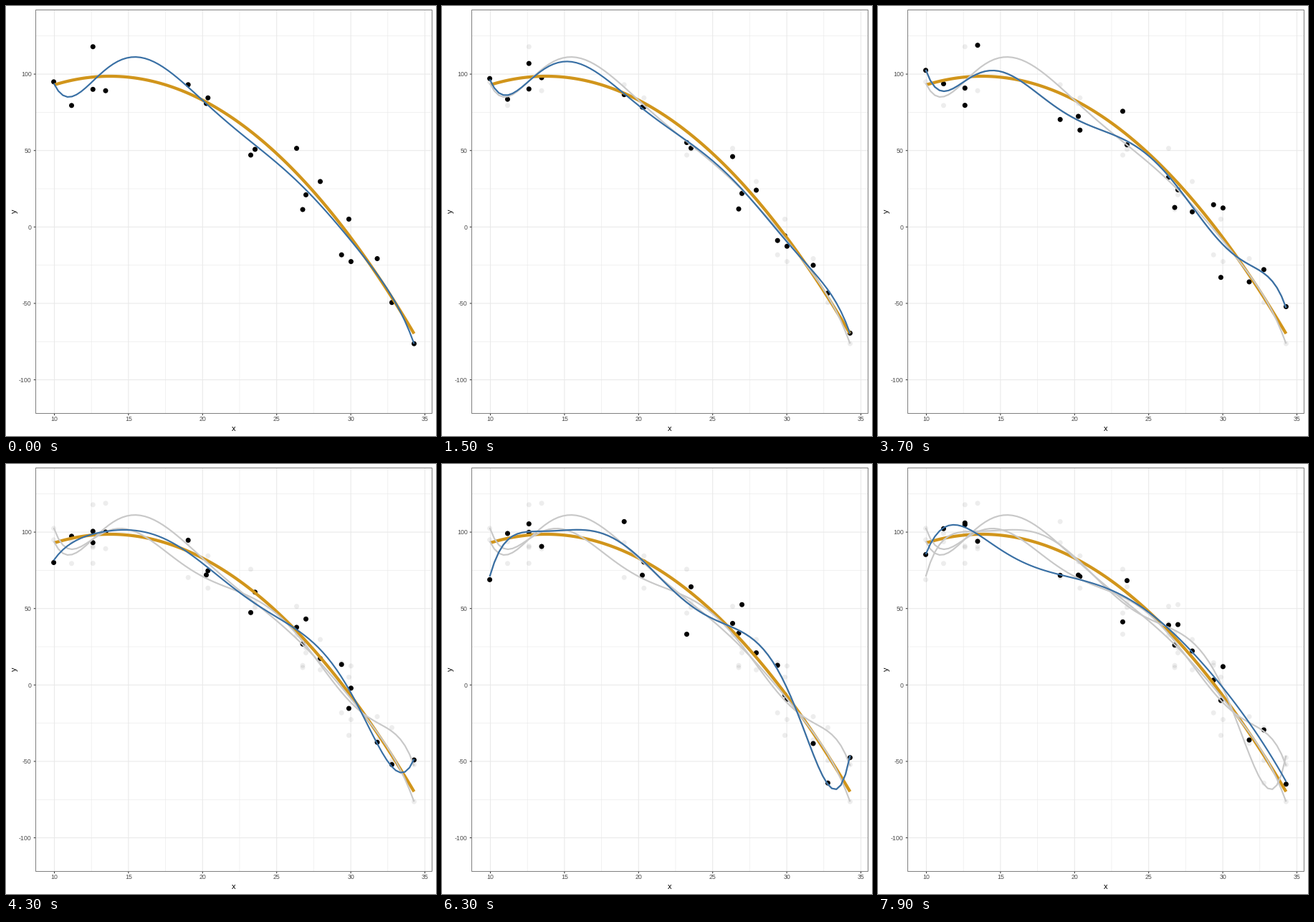
Recreate the animation shown at these times as a matplotlib script. Size 600x600 px, loop 8000 ms.

```python
import numpy as np
import matplotlib.pyplot as plt
from matplotlib.animation import FuncAnimation
from matplotlib.patches import Rectangle
from numpy.polynomial import Polynomial

plt.rcParams["font.family"] = "Liberation Sans"

SIZE, DPI = 600, 100
PT = 72 / DPI  # points per pixel
FRAMES, INTERVAL = 80, 100
DEGREE = 7

BLUE, GOLD, GREY = "#386fa4", "#d1951b", "#c8c8c8"
GRID, BORDER, TICK, LABEL = "#e9e9e9", "#7f7f7f", "#333333", "#4d4d4d"
LEFT, TOP, RIGHT, BOTTOM = 41.5, 5.5, 594.5, 568.5
Y_MIN, Y_MAX = -122, 142

# First sample, in pixels
XS = np.array([66.6, 91.5, 121.3, 121.3, 139, 254.2, 279.5, 281.8, 341.5, 347.5,
               405.5, 414, 418.5, 438.5, 468.2, 478.4, 481.4, 518, 538.4, 569.4])
FIRST = np.array([105.8, 138.8, 56.8, 116.3, 118.2, 109.8, 136, 128.2, 208, 200,
                  198.6, 284, 263.5, 244.9, 347.2, 297.4, 356.6, 352.5, 413.7, 471.2])

# Heights of the later fits at Chebyshev nodes
KNOTS = [[89, 119, 90, 150, 206, 326, 378, 421],
         [157, 106, 93, 119, 214, 299, 453, 407],
         [126, 89, 113, 156.5, 204, 304, 401, 443]]
NOISE = 24

# Frames at which the samples start and stop moving
MOVE_FRAMES = [13, 20, 39, 45, 64, 70]
MOVE_STATES = [0, 1, 1, 2, 2, 3]
SHADOW_FROM = [4, 30, 55]

CURVE_X = np.linspace(XS[0], XS[-1], 80)


def px(x):
    return 67.5 + 20.68 * (x - 10)


def py(y):
    return TOP + (Y_MAX - y) * (BOTTOM - TOP) / (Y_MAX - Y_MIN)


def fit(ys, at=CURVE_X):
    return Polynomial.fit(XS, ys, DEGREE)(at)


def resample(knots, rng):
    """Noisy heights at XS whose fit is the polynomial through the knots."""
    t = (1 - np.cos(np.pi * np.arange(DEGREE + 1) / DEGREE)) / 2
    nodes = XS[0] + t * (XS[-1] - XS[0])
    trend = Polynomial.fit(nodes, knots, DEGREE)(XS)
    noise = rng.normal(0, NOISE, len(XS))
    return trend + noise - fit(noise, XS)


rng = np.random.default_rng(4)
samples = [FIRST] + [resample(knots, rng) for knots in KNOTS]

fig = plt.figure(figsize=(SIZE / DPI, SIZE / DPI), dpi=DPI, facecolor="white")
ax = fig.add_axes([0, 0, 1, 1])
ax.set_xlim(0, SIZE)
ax.set_ylim(SIZE, 0)
ax.axis("off")


def line(x, y, color, width, z):
    return ax.plot(x, y, color=color, lw=width * PT, zorder=z, snap=False,
                   solid_capstyle="butt", solid_joinstyle="round")[0]


def dots(ys, z, alpha=1):
    # One size per dot keeps positions off the pixel grid
    return ax.scatter(XS, ys, s=np.full(len(XS), (7 * PT) ** 2), color="black",
                      linewidths=0, alpha=alpha, zorder=z)


def label(x, y, text, size=8.8, color=LABEL, **kw):
    ax.text(x, y, text, fontsize=size * PT, color=color, **kw)


def draw_axes():
    for v in np.arange(12.5, 35, 5):
        line([px(v)] * 2, [TOP, BOTTOM], GRID, 0.6, 0)
    for v in range(-75, 126, 50):
        line([LEFT, RIGHT], [py(v)] * 2, GRID, 0.6, 0)
    for v in range(10, 36, 5):
        x = px(v)
        line([x, x], [TOP, BOTTOM], GRID, 1.07, 1)
        line([x, x], [BOTTOM, BOTTOM + 2.75], TICK, 1.07, 8)
        label(x, 579.4, str(v), ha="center", va="baseline")
    for v in range(-100, 101, 50):
        y = py(v)
        line([LEFT, RIGHT], [y, y], GRID, 1.07, 1)
        line([LEFT - 2.75, LEFT], [y, y], TICK, 1.07, 8)
        label(35.6, y + 3.2, str(v), ha="right", va="baseline")
    ax.add_patch(Rectangle((LEFT, TOP), RIGHT - LEFT, BOTTOM - TOP, fill=False,
                           ec=BORDER, lw=PT, snap=False, zorder=9))
    label(317.8, 593, "x", 11, "black", ha="center", va="baseline")
    label(11.5, 286.5, "y", 11, "black", ha="center", va="center", rotation=90)


draw_axes()

# True relationship
truth_x = np.linspace(10, 34.27, 100)
line(px(truth_x), py(23 + 11 * truth_x - 0.4 * truth_x ** 2), GOLD, 4.27, 4)

shadows = [(dots(ys, 2, 0.07), line(CURVE_X, fit(ys), GREY, 2.13, 5))
           for ys in samples[:-1]]
points = dots(FIRST, 3)
curve = line(CURVE_X, fit(FIRST), BLUE, 2.13, 6)


def update(frame):
    pos = np.interp(frame, MOVE_FRAMES, MOVE_STATES)
    k = min(int(pos), len(samples) - 2)
    ys = samples[k] + (pos - k) * (samples[k + 1] - samples[k])
    points.set_offsets(np.column_stack([XS, ys]))
    curve.set_ydata(fit(ys))
    for start, pair in zip(SHADOW_FROM, shadows):
        for artist in pair:
            artist.set_visible(frame >= start)
    return [points, curve]


anim = FuncAnimation(fig, update, frames=FRAMES, init_func=lambda: update(0),
                     interval=INTERVAL, repeat=True, repeat_delay=0)
plt.show()
```
